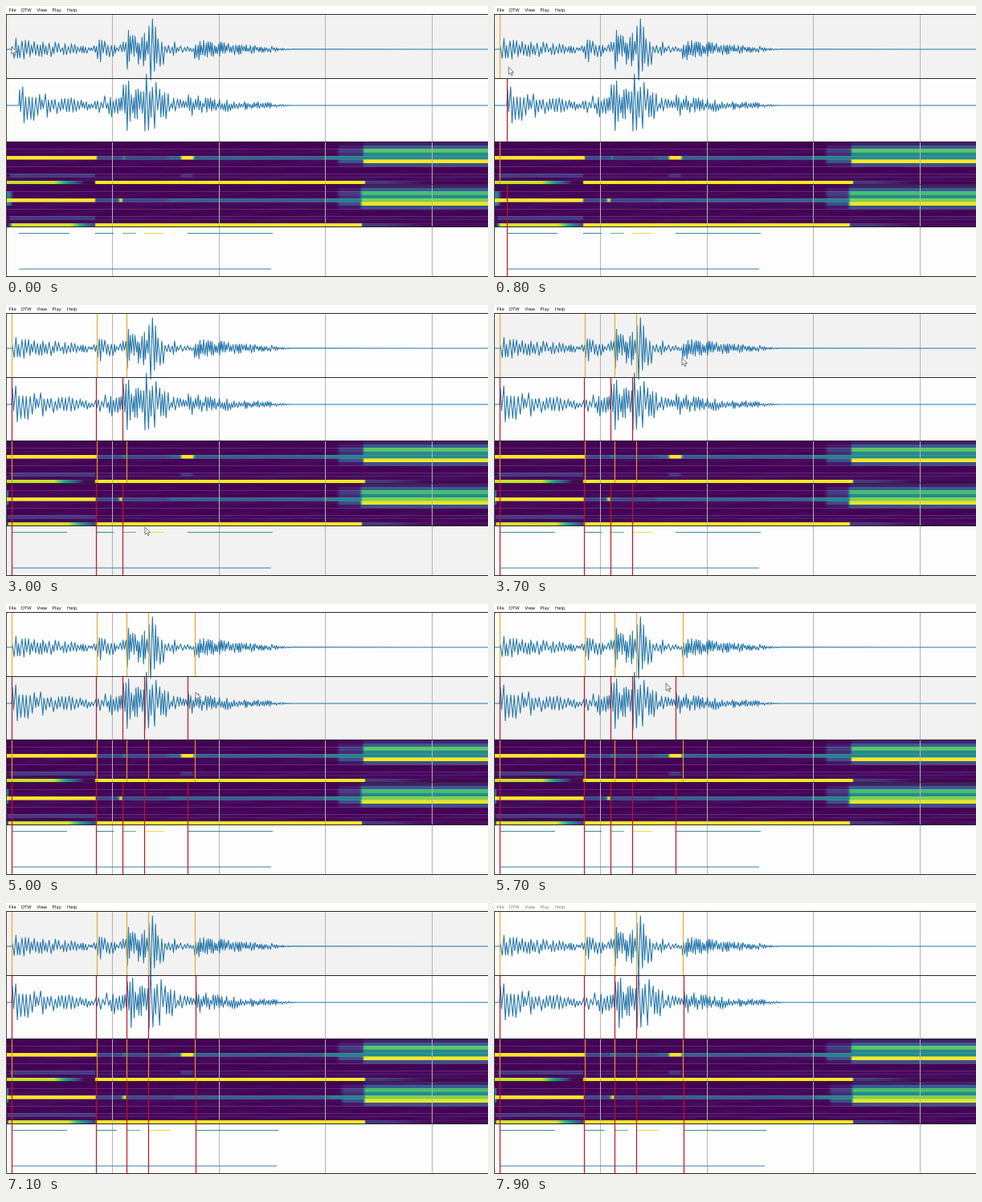
Recreate the animation shown at these times as an HTML page. Size 600x338 px, loop 8 s.

```html
<!DOCTYPE html>
<html lang="en">
<head>
<meta charset="utf-8">
<title>Waveform alignment</title>
<style>
  html, body { margin: 0; width: 100%; height: 100%; overflow: hidden; background: #fff; }
  svg { display: block; width: 100vw; height: 100vh; }
  text { font: 5.8px "Open Sans", "Noto Sans", sans-serif; }
  .crisp { shape-rendering: crispEdges; }
</style>
</head>
<body>
<svg id="stage" viewBox="0 0 600 338"></svg>
<script>
const LOOP = 8000, STEP = 100, WIDTH = 600;
const stage = document.getElementById('stage');

function set(node, attrs) {
  for (const key in attrs) node.setAttribute(key, attrs[key]);
}
function el(tag, attrs, parent = stage) {
  const node = document.createElementNS('http://www.w3.org/2000/svg', tag);
  set(node, attrs);
  return parent.appendChild(node);
}
function random(seed) {
  return () => (seed = (seed * 16807) % 2147483647) / 2147483647;
}
const clamp = v => Math.max(0, Math.min(1, v));
const mix = (a, b, k) => a + (b - a) * k;

const warps = [
  { at: 0,    xs: [0, 16, 79, 111, 145, 172, 226, 443, WIDTH] },
  { at: 1100, xs: [0, 7, 76, 112, 145, 172, 226, 443, WIDTH] },
  { at: 6000, xs: [0, 7, 76, 112, 150, 177, 236, 447, WIDTH] }
];
function warpX(x, to) {
  const from = warps[0].xs;
  const i = Math.max(1, from.findIndex(edge => edge >= x));
  return mix(to[i - 1], to[i], (x - from[i - 1]) / (from[i] - from[i - 1]));
}

// Each burst rings out from its start: loudness decays, random zigzag inside.
function wave(mid, bursts, seed) {
  const rnd = random(seed), points = [[0, mid], [bursts[0].start, mid]];
  let sign = 1;
  bursts.forEach(({ start, peak, decay, pitch }, i) => {
    const end = i + 1 < bursts.length ? bursts[i + 1].start : 356;
    for (let x = start + 1; x < end; x += pitch * (0.6 + 0.8 * rnd())) {
      const loud = peak * Math.exp((start - x) / decay) * clamp((356 - x) / 25);
      const swing = Math.min(39, loud * (0.2 + 0.9 * rnd()));
      points.push([x, mid - sign * swing]);
      sign = -sign;
    }
  });
  points.push([WIDTH, mid]);
  return points;
}
const path = (points, map = x => x) =>
  'M' + points.map(([x, y]) => map(x).toFixed(1) + ' ' + y.toFixed(1)).join('L');

const wave1 = wave(54, [
  { start: 7, peak: 15, decay: 90, pitch: 1.9 },
  { start: 113, peak: 15, decay: 90, pitch: 1.7 },
  { start: 150, peak: 23, decay: 150, pitch: 1.5 },
  { start: 177, peak: 50, decay: 19, pitch: 2 },
  { start: 234, peak: 13, decay: 75, pitch: 1.4 }
], 4711);
const wave2 = wave(124, [
  { start: 16, peak: 24, decay: 65, pitch: 2 },
  { start: 111, peak: 16, decay: 100, pitch: 1.7 },
  { start: 145, peak: 34, decay: 45, pitch: 1.5 },
  { start: 172, peak: 50, decay: 23, pitch: 2 },
  { start: 226, peak: 14, decay: 75, pitch: 1.4 }
], 90210);

const ramp = ['440154', '482878', '3e4a89', '31688e', '26828e', '1f9e89', '35b779', '6ece58', 'b5de2b', 'fde725']
  .map(hex => [0, 2, 4].map(i => parseInt(hex.slice(i, i + 2), 16)));
function viridis(level) {
  const p = Math.min(clamp(level), 0.9999) * 9, i = Math.floor(p);
  return `rgb(${ramp[i].map((c, k) => Math.round(mix(c, ramp[i + 1][k], p - i)))})`;
}

// A band lights one pitch row between two moments, with optional fades.
const band = (row, from, to, level, fadeIn = 1, fadeOut = 1) => ({ row, from, to, level, fadeIn, fadeOut });
const bandLevel = (b, x) =>
  b.level * clamp((x - b.from) / b.fadeIn + 1) * clamp((b.to - x) / b.fadeOut + 1);

// Bands common to both recordings, given where speech and silence begin.
function commonBands(second, hiss, hissLevels) {
  return [
    band(4, 0, second, 1), band(4, second, 390, 0.22), band(4, 205, hiss, 0.31, 20),
    band(4, 398, hiss, 0.44, 10),
    band(9, 6, second - 1, 0.17), band(11, second, hiss, 1), band(11, hiss, 470, 0.16, 1, 60),
    ...hissLevels.flatMap((level, row) => [
      band(row, hiss, WIDTH, level, 3),
      band(row, 416, hiss, level * 0.25, 5)
    ])
  ];
}
const bands1 = [
  ...commonBands(112, 446, [0.08, 0.31, 0.74, 0.48, 0.48, 1, 0.25]),
  band(11, 0, 60, 0.92, 1, 38), band(4, 145, 149, 0.42, 2, 2),
  band(4, 219, 233, 1, 4, 3), band(9, 219, 231, 0.15, 3, 3)
];
const bands2 = [
  ...commonBands(111, 443, [0.08, 0.31, 0.7, 0.48, 0.8, 0.97, 0.25]),
  band(11, 8, 80, 0.94, 5, 36), band(4, 141, 144, 0.9, 2, 2),
  ...[2, 3, 5].map(row => band(row, 0, 4, 0.45, 1, 5))
];

const defs = el('defs', {});
function spectrogram(top, bands, seed) {
  const rnd = random(seed), rowHeight = 53 / 12, stops = [];
  for (let row = 0; row < 12; row++) {
    const id = `row${seed}-${row}`, murmur = rnd() * 0.03;
    const rowBands = bands.filter(b => b.row === row);
    const gradient = el('linearGradient', { id, gradientUnits: 'userSpaceOnUse', x1: 0, x2: WIDTH }, defs);
    for (let x = 0; x <= WIDTH; x += 2) {
      const base = murmur + 0.012 * Math.sin(x / 17 + row * 2);
      const level = Math.max(base, ...rowBands.map(b => bandLevel(b, x)));
      stops.push({ x, node: el('stop', { offset: x / WIDTH, 'stop-color': viridis(level) }, gradient) });
    }
    el('rect', { x: 0, y: top + row * rowHeight, width: WIDTH, height: rowHeight + 0.2, fill: `url(#${id})` });
  }
  return stops;
}

// Layers, back to front.
el('rect', { width: WIDTH, height: 338, fill: '#fff' });
const panels = [[11, 90], [90, 169], [169, 275], [275, 337]].map(([y, end]) => ({
  end, node: el('rect', { y, width: WIDTH, height: end - y })
}));
spectrogram(169.5, bands1, 31);
const warpedStops = spectrogram(222.5, bands2, 77);
for (let i = 0; i < 4; i++)
  el('rect', { x: Math.round(132 + i * 132.7), y: 11, width: 1, height: 326, fill: '#b4b4b4', class: 'crisp' });

const ink = { stroke: '#2878ac', 'stroke-width': 1.1, fill: 'none', 'stroke-linejoin': 'round' };
el('path', { ...ink, d: path(wave1) });
const secondWave = el('path', ink);

const notes = [
  [16, 79, 283.5, '#3f8f9c'], [111, 134, 283.5, '#3f8f9c'], [145, 162, 283.5, '#69b98a'],
  [172, 197, 283.5, '#e4e04a'], [226, 332, 283.5, '#3f8f9c'], [16, 330, 328, '#3a7fa5']
].map(([from, to, y, stroke]) => ({ from, to, y, node: el('path', { stroke, 'stroke-width': 1.1 }) }));

for (const y of [10, 90, 169, 222, 275, 337])
  el('rect', { y, width: WIDTH, height: 1, fill: '#2a2a2a', class: 'crisp' });
el('rect', { y: 10, width: 1, height: 328, fill: '#444', class: 'crisp' });

const mark = (x, at, y) => ({ x, at, y, node: el('g', { 'stroke-width': 1.2 }) });
const orangeMarks = [[7, 300], [113, 2200], [150, 2550], [177, 3600], [235, 3900]]
  .map(([x, at]) => mark(x, at, 66));
for (const { x, node } of orangeMarks) {
  el('path', { d: `M${x + 0.5} 11V90`, stroke: '#e2ac35' }, node);
  el('path', { d: `M${x + 0.5} 170V222`, stroke: '#ec922d' }, node);
}
const redMarks = [[16, 600], [111, 1400], [145, 1600], [172, 3450], [226, 4500]]
  .map(([x, at]) => mark(x, at, 116));
for (const m of redMarks) m.line = el('path', { stroke: '#be1622' }, m.node);
const marks = [...orangeMarks, ...redMarks];

const menu = el('g', {});
[['File', 3.5], ['DTW', 19], ['View', 38.5], ['Play', 57.5], ['Help', 76]].forEach(([label, x]) => {
  el('text', { x, y: 7.4 }, menu).textContent = label;
});
const cursor = el('path', {
  d: 'M0 0V9.2L2.1 7.2L3.6 10.6L5.1 9.9L3.6 6.7H6.5Z',
  fill: '#fff', stroke: '#555', 'stroke-width': 0.8, 'stroke-linejoin': 'round'
});

// The pointer reaches each mark shortly before it appears, with a few other stops.
const visits = [
  ...marks.map(({ x, at, y }) => ({ at: at - 200, x: x - 1, y })),
  { at: 0, x: 7, y: 51 },
  { at: 950, x: 24, y: 3 },
  { at: 2900, x: 173, y: 277 },
  { at: 4900, x: 236, y: 110 },
  { at: 5900, x: 25, y: 3 },
  { at: 6700, x: 40, y: -15 }
].sort((a, b) => a.at - b.at);
function pointer(t) {
  const next = visits.findIndex(v => v.at > t);
  if (next < 0) return visits[visits.length - 1];
  const a = visits[next - 1], b = visits[next];
  const k = clamp(1 - (b.at - t) / Math.min(250, b.at - a.at)), ease = k * k * (3 - 2 * k);
  return { x: mix(a.x, b.x, ease), y: mix(a.y, b.y, ease) };
}

let shownWarp;
function applyWarp(warp) {
  if (warp === shownWarp) return;
  shownWarp = warp;
  const map = x => warpX(x, warp.xs);
  set(secondWave, { d: path(wave2, map) });
  for (const { node, x } of warpedStops) set(node, { offset: map(x) / WIDTH });
  for (const { node, from, to, y } of notes) set(node, { d: `M${map(from)} ${y}H${map(to)}` });
  for (const { line, x } of redMarks) set(line, { d: `M${map(x) + 0.5} 91V169m0 54V337` });
}

function render(time) {
  const t = Math.floor((time % LOOP) / STEP) * STEP;
  applyWarp(warps.filter(w => t >= w.at).pop());
  for (const { at, node } of marks) set(node, { visibility: t >= at ? 'visible' : 'hidden' });

  const { x, y } = pointer(t), unfocused = t >= 7400;
  set(cursor, { transform: `translate(${x.toFixed(1)} ${y.toFixed(1)})` });
  const hovered = panels.find(p => y < p.end);
  for (const p of panels) set(p.node, { fill: p === hovered && !unfocused ? '#f2f2f2' : '#fdfdfd' });
  set(menu, { fill: unfocused ? '#777' : '#000' });
}

const start = performance.now();
function tick() {
  render(performance.now() - start);
  requestAnimationFrame(tick);
}
tick();
</script>
</body>
</html>
```
